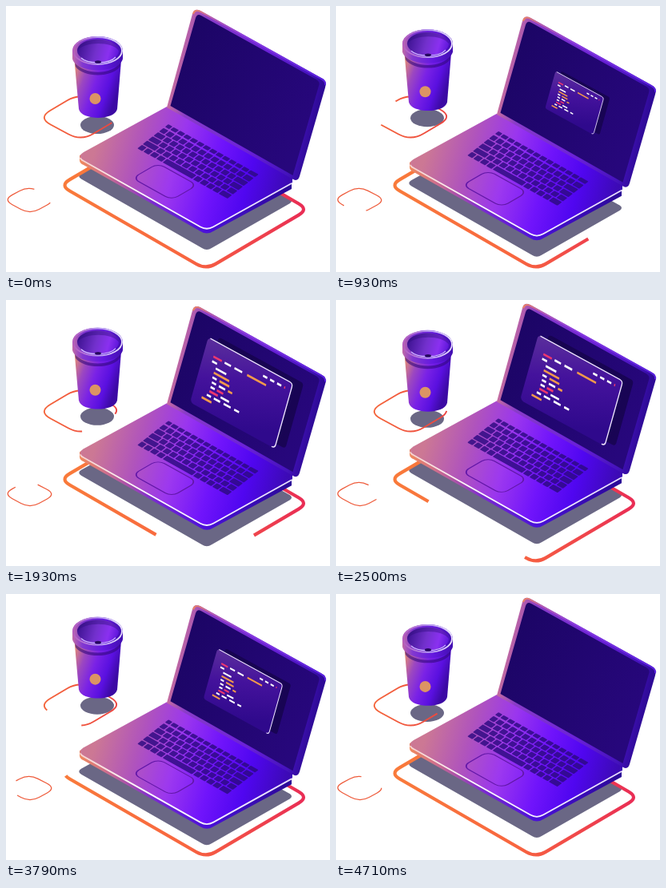
An HTML page that plays this animation: 405 px wide and 333 px high, repeating every 4.78 s.

```html
<!DOCTYPE html>
<html lang="en">
<head>
<meta charset="utf-8">
<title>Floating laptop and cup</title>
<style>
  html, body { margin: 0; height: 100%; overflow: hidden; background: #fff; }
  svg { display: block; width: 100vw; height: 100vh; }
</style>
</head>
<body>
<svg viewBox="0 0 405 333" fill="none">
  <defs>
    <linearGradient id="line" gradientUnits="userSpaceOnUse" x1="70" y1="0" x2="375" y2="0">
      <stop stop-color="#f97b3b"/><stop offset=".5" stop-color="#f8663f"/><stop offset="1" stop-color="#e92c55"/>
    </linearGradient>
    <linearGradient id="cupLine" gradientUnits="userSpaceOnUse" x1="48" y1="0" x2="140" y2="0">
      <stop stop-color="#f4643a"/><stop offset="1" stop-color="#ec4440"/>
    </linearGradient>
    <linearGradient id="deck" gradientUnits="userSpaceOnUse" x1="115" y1="165" x2="350" y2="230">
      <stop stop-color="#cc7894"/><stop offset=".22" stop-color="#b054bc"/><stop offset=".42" stop-color="#9a36ee"/>
      <stop offset=".62" stop-color="#7014fb"/><stop offset=".8" stop-color="#5006f0"/><stop offset="1" stop-color="#3c0ab4"/>
    </linearGradient>
    <linearGradient id="side" gradientUnits="userSpaceOnUse" x1="92" y1="0" x2="357" y2="0">
      <stop stop-color="#f08a5c"/><stop offset=".12" stop-color="#d0708c"/><stop offset=".35" stop-color="#7a2ad0"/>
      <stop offset=".6" stop-color="#4a10d8"/><stop offset="1" stop-color="#2a0896"/>
    </linearGradient>
    <linearGradient id="edge" gradientUnits="userSpaceOnUse" x1="92" y1="0" x2="357" y2="0">
      <stop stop-color="#f6d2d0"/><stop offset=".3" stop-color="#fff"/><stop offset="1" stop-color="#e6dcff"/>
    </linearGradient>
    <linearGradient id="lid" gradientUnits="userSpaceOnUse" x1="203" y1="110" x2="385" y2="150">
      <stop stop-color="#c9709c"/><stop offset=".14" stop-color="#8a3cc8"/>
      <stop offset=".6" stop-color="#6a20d8"/><stop offset=".9" stop-color="#4412bc"/><stop offset="1" stop-color="#2e0a96"/>
    </linearGradient>
    <linearGradient id="lidTop" gradientUnits="userSpaceOnUse" x1="234" y1="0" x2="400" y2="0">
      <stop stop-color="#ee8660"/><stop offset=".14" stop-color="#b45cb0"/><stop offset=".4" stop-color="#8a3ce0"/><stop offset="1" stop-color="#5a20e0"/>
    </linearGradient>
    <linearGradient id="screen" gradientUnits="userSpaceOnUse" x1="215" y1="60" x2="380" y2="150">
      <stop stop-color="#1c0566"/><stop offset="1" stop-color="#27077c"/>
    </linearGradient>
    <linearGradient id="pane" x1="0" y1="0" x2=".6" y2="1">
      <stop stop-color="#5b2f9c"/><stop offset=".45" stop-color="#44129c"/><stop offset="1" stop-color="#2f098c"/>
    </linearGradient>
    <linearGradient id="cup" gradientUnits="userSpaceOnUse" x1="84" y1="84" x2="141" y2="104">
      <stop stop-color="#e08878"/><stop offset=".24" stop-color="#9c48c0"/><stop offset=".5" stop-color="#7a22e6"/>
      <stop offset=".78" stop-color="#5a10e0"/><stop offset="1" stop-color="#3c0aa4"/>
    </linearGradient>
    <linearGradient id="cap" gradientUnits="userSpaceOnUse" x1="83" y1="0" x2="147" y2="0">
      <stop stop-color="#c06aa8"/><stop offset=".2" stop-color="#8238d0"/><stop offset=".6" stop-color="#6418e0"/><stop offset="1" stop-color="#400eae"/>
    </linearGradient>
    <linearGradient id="well" gradientUnits="userSpaceOnUse" x1="90" y1="48" x2="141" y2="62">
      <stop stop-color="#3c1290"/><stop offset=".45" stop-color="#7230cc"/><stop offset=".75" stop-color="#8a30f0"/><stop offset="1" stop-color="#5a14d8"/>
    </linearGradient>
    <linearGradient id="rim" gradientUnits="userSpaceOnUse" x1="84" y1="0" x2="146" y2="0">
      <stop stop-color="#b45cc0"/><stop offset=".5" stop-color="#b89cf0"/><stop offset="1" stop-color="#ece4ff"/>
    </linearGradient>
  </defs>

  <path id="deckShadow" fill="#6a6785" d="M196 153L94 209.500Q88.500 213 94 216.500L245 303Q251 307 257 303L355 247Q359 244 355 241Z"/>
  <ellipse id="cupShadow" fill="#6a6785" cx="114" cy="149" rx="21" ry="11"/>
  <g id="loops"></g>

  <g id="laptop">
    <path fill="url(#side)" d="M201 133L92 187V193Q92 197 97 199L243 282Q251 287 259 282L357 229V221Z"/>
    <path fill="url(#deck)" d="M201 126L97 183Q88 188.500 97 194L243 276Q251 280 259 276L358 221V212Z"/>
    <path stroke="url(#edge)" stroke-width="1.8" d="M93 190Q93 192 97 194L243 276.500Q251 281 259 276.500L357 222"/>
    <g id="keys" fill="#2c0a80" fill-opacity=".82" transform="matrix(.873 .487 -.77 .6 203 148)"></g>
    <rect transform="matrix(.873 .487 -.86 .5 190 197)" width="56" height="37" rx="9" fill="#b050ff" fill-opacity=".08" stroke="#6217a8" stroke-width="1.4"/>
    <path fill="url(#lid)" d="M201 127L233 10Q235 2 243 6L394 90Q402 94 399 102L367 213Q365 220 359 217Z"/>
    <path stroke="url(#lidTop)" stroke-width="2" d="M234 10Q236 3.500 243 7L394 91Q400 94 399 99"/>
    <path fill="url(#screen)" d="M205.500 125L237 15Q239 9 244 12L388 92Q393 95 391 100L358.500 212Z"/>
    <g id="popup">
      <g transform="matrix(.877 .48 -.27 .963 266 43)"><rect width="121" height="85" rx="4" fill="#150348" fill-opacity=".75"/></g>
      <g id="code" transform="matrix(.877 .48 -.27 .963 253 43)" stroke-width="2.7">
        <rect width="121" height="85" rx="5" fill="url(#pane)"/>
        <path d="M3 .5H116Q120.500 .5 120.500 5V80Q120.500 84.500 116 84.500" stroke="#f2eaff" stroke-width="1.3"/>
      </g>
    </g>
  </g>

  <g id="mug">
    <path fill="url(#cup)" d="M85.500 68L91 129C94 143.500 136 143.500 139 129L144 68Z"/>
    <path fill="#32087e" fill-opacity=".6" d="M86 70C96 87 134 87 143 70V75C134 90 97 90 87 76Z"/>
    <path fill="url(#cap)" d="M83 56V66C87 85 142 85 146 66V56Z"/>
    <ellipse fill="url(#cap)" cx="114.500" cy="56" rx="31.500" ry="18"/>
    <ellipse stroke="url(#rim)" stroke-width="1.800" cx="114.500" cy="56" rx="30.500" ry="17"/>
    <ellipse fill="url(#well)" cx="115" cy="56" rx="26" ry="14.500"/>
    <path fill="#2c0a78" fill-opacity=".4" d="M89 56C89 37 141 37 141 56C133 44 98 44 89 56Z"/>
    <path stroke="#d0bcff" stroke-width="1.200" d="M94 65C102 73 129 73 137 64"/>
    <ellipse fill="#25085e" cx="115" cy="70" rx="4" ry="1.800"/>
    <circle fill="#dc9464" cx="111.500" cy="116" r="7"/>
  </g>
</svg>

<script>
const $ = id => document.getElementById(id);

function add(parent, tag, attrs) {
  const node = document.createElementNS('http://www.w3.org/2000/svg', tag);
  for (const name in attrs) node.setAttribute(name, attrs[name]);
  return parent.appendChild(node);
}

// Closed polygon with rounded corners; d is the length cut from each side.
function roundedPath(points, d) {
  const n = points.length;
  const toward = (a, b) => {
    const k = d / Math.hypot(b[0] - a[0], b[1] - a[1]);
    return [a[0] + (b[0] - a[0]) * k, a[1] + (b[1] - a[1]) * k];
  };
  let path = 'M' + toward(points[0], points[1]);
  for (let i = 1; i <= n; i++) {
    const corner = points[i % n];
    path += `L${toward(corner, points[i - 1])}Q${corner} ${toward(corner, points[(i + 1) % n])}`;
  }
  return path + 'Z';
}

// A loop with one gap; "lead" is where the gap's front end starts.
function makeLoop(points, d, stroke, width, gap, lead, turns) {
  const node = add($('loops'), 'path', {
    d: roundedPath(points, d), pathLength: 1, stroke, 'stroke-width': width,
    'stroke-dasharray': `${1 - gap} ${gap}`
  });
  return p => node.setAttribute('stroke-dashoffset', -(lead + turns * p));
}

const loops = [
  makeLoop([[196, 149], [378, 254.5], [250, 330], [67.5, 224.5]], 14, 'url(#line)', 4.2, .2, .18, 1),
  makeLoop([[92, 109], [40, 140], [94, 169], [146, 138]], 18, 'url(#cupLine)', 1.9, .22, -.157, 2),
  makeLoop([[62.5, 243], [30, 260.7], [-3.5, 242.5], [28.5, 225.3]], 13, '#ee5c3c', 1.3, .23, -.04, 2)
];

// Keyboard: the first key of each row sets the stagger, the last fills the row.
[6, 7, 11, 13, 17, 7].forEach((first, row) => {
  const y = row ? row * 8.8 - 1 : 0, height = row ? 7.4 : 5.5;
  for (let x = 0, width = first; x < 128; x += width + 1.5, width = 7.7) {
    if (row === 5 && x > 34 && x < 40) width = 42;
    if (x + width > 119) width = 129 - x;
    add($('keys'), 'rect', { x, y, width, height, rx: 1 });
  }
});

// Code lines: y, then start, length and colour of each dash.
const white = '#fff', pink = '#f0386e', orange = '#f29a4a';
[
  [10, [81, 6, white], [91, 6, white], [101, 6, white], [111, 1.5, pink]],
  [19, [13, 12, pink], [29, 9, white], [43, 11, white], [61, 27, orange]],
  [25, [13, 7, white]],
  [31, [20, 15, white]],
  [37, [19, 22, orange]],
  [43, [19, 6, white], [29, 14, orange]],
  [49, [20, 6, white], [30, 9, white], [43, 6, orange]],
  [55, [20, 6, white], [29, 9, pink]],
  [60.500, [20, 12, pink], [36, 12, white]],
  [66, [18, 6, white], [28, 9, white], [42, 10, white], [57, 7, white]],
  [72, [12.5, 14, orange]]
].forEach(([y, ...dashes]) => dashes.forEach(([x, length, stroke]) =>
  add($('code'), 'path', { d: `M${x} ${y}h${length}`, stroke })));

const smooth = (from, to, t) => {
  const x = Math.min(1, Math.max(0, (t - from) / (to - from)));
  return x * x * (3 - 2 * x);
};
const moveY = (id, y) => $(id).setAttribute('transform', `translate(0 ${y})`);

const DURATION = 4780, STEPS = 67, RATE = 14;

function draw(now) {
  // 14 pictures per second, held on a 10 ms clock
  const clock = Math.floor(now % DURATION / 10) * 10;
  const step = Math.floor((clock + 5) * RATE / 1000);
  const t = step * 1000 / RATE, p = step / STEPS;
  const lift = 5 * (1 - Math.cos(4 * Math.PI * p));

  moveY('laptop', lift);
  moveY('deckShadow', lift);
  moveY('mug', -lift);
  moveY('cupShadow', -lift);
  loops.forEach(update => update(p));

  const scale = smooth(600, 1200, t) - smooth(3600, 4200, t);
  $('popup').setAttribute('transform', `translate(303 112) scale(${scale}) translate(-303 -112)`);
  $('popup').setAttribute('visibility', scale > 0 ? 'visible' : 'hidden');
}

const start = performance.now();
(function tick() {
  draw(performance.now() - start);
  requestAnimationFrame(tick);
})();
</script>
</body>
</html>
```
